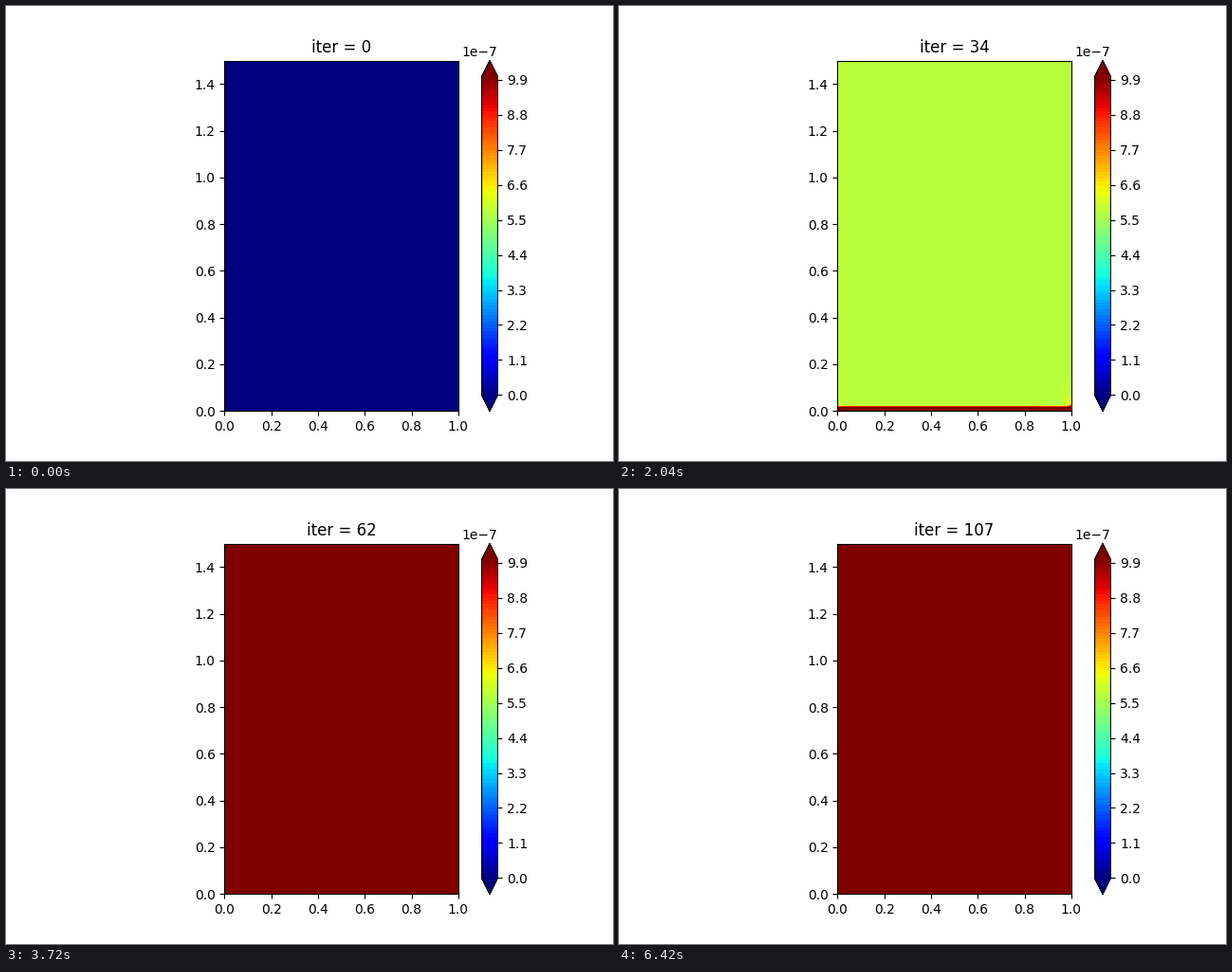
A matplotlib script for the animation above (6480 ms loop, 640x480 px).

```python
import numpy as np
import matplotlib.pyplot as plt
from matplotlib.animation import FuncAnimation

FRAMES = 108
PEAK = 1e-6

fig, ax = plt.subplots(figsize=(6.4, 4.8), dpi=100)
style = dict(levels=np.linspace(0, PEAK, 101), cmap="jet",
             extend="both", vmin=0, vmax=PEAK)

# grid refined towards the lower right corner
x = 1 - np.linspace(1, 0, 100) ** 2
y = 1.5 * np.linspace(0, 1, 140) ** 2
X, Y = np.meshgrid(x, y)
R2 = (X - 1) ** 2 + Y ** 2 + 1e-6
corner = (Y ** 2 - (X - 1) ** 2) / R2 ** 2


def field(n):
    t = n / 39
    level = 0.8667 * t ** 3
    depth = min(0.00085 * n, 0.022) + 1e-9
    wall = 0.9 * level * np.clip((depth - Y) / (0.4 * depth), 0, 1)
    lobes = np.clip(1.92e-4 * t ** 5.5 * corner, -0.012 * level, level)
    # the diverging solution flips its sign at a steady pace
    flips = int(max(0, n - 40) / 10.7)
    return PEAK * (level + wall + lobes) * (-1) ** flips


base = ax.contourf(X, Y, field(0), **style)
ax.set_aspect("equal")
fig.colorbar(base, ax=ax, aspect=22)
title = ax.set_title("iter = 0")
shown = []


def update(n):
    while shown:
        shown.pop().remove()
    shown.append(ax.contourf(X, Y, field(n), **style))
    title.set_text(f"iter = {n}")


anim = FuncAnimation(fig, update, frames=FRAMES, interval=60,
                     repeat=True, repeat_delay=0)
plt.show()
```
